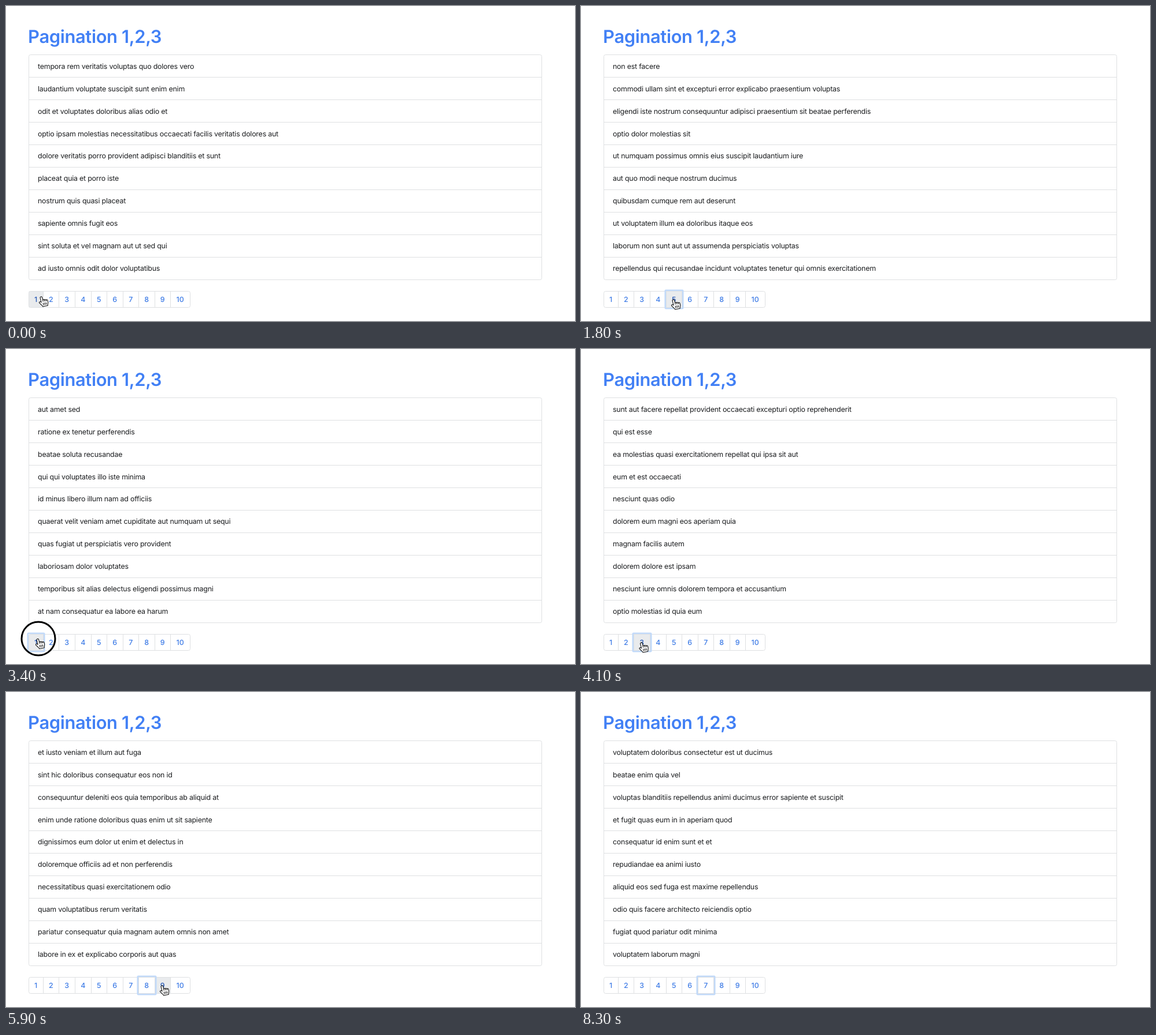
An HTML page that plays this animation: 984 px wide and 546 px high, repeating every 8600 ms.

```html
<!DOCTYPE html>
<html lang="en">
<head>
<meta charset="utf-8">
<title>Pagination</title>
<style>
  html, body { margin: 0; width: 100%; height: 100%; overflow: hidden; background: #fff; }
  svg { display: block; width: 984px; height: 546px; }
  text { font-family: Inter, "Open Sans", sans-serif; text-rendering: geometricPrecision; }
  .title { font-size: 30.9px; font-weight: 600; letter-spacing: -.36px; fill: #4280f5; }
  .row { font-size: 12.4px; letter-spacing: -.21px; fill: #1c1e20; }
  .num { font-size: 12.4px; font-weight: 500; text-anchor: middle; fill: #3d7be6; }
  .num.over { fill: #2457b5; }
  .line { fill: none; stroke: #dee0e2; }
</style>
</head>
<body>
<svg id="stage" viewBox="0 0 984 546"></svg>
<script>
const PAGES = `sunt aut facere repellat provident occaecati excepturi optio reprehenderit
qui est esse
ea molestias quasi exercitationem repellat qui ipsa sit aut
eum et est occaecati
nesciunt quas odio
dolorem eum magni eos aperiam quia
magnam facilis autem
dolorem dolore est ipsam
nesciunt iure omnis dolorem tempora et accusantium
optio molestias id quia eum

et ea vero quia laudantium autem
in quibusdam tempore odit est dolorem
dolorum ut in voluptas mollitia et saepe quo animi
voluptatem eligendi optio
eveniet quod temporibus
sint suscipit perspiciatis velit dolorum rerum ipsa laboriosam odio
fugit voluptas sed molestias voluptatem provident
voluptate et itaque vero tempora molestiae
adipisci placeat illum aut reiciendis qui
doloribus ad provident suscipit at

asperiores ea ipsam voluptatibus modi minima quia sint
dolor sint quo a velit explicabo quia nam
maxime id vitae nihil numquam
autem hic labore sunt dolores incidunt
rem alias distinctio quo quis
est et quae odit qui non
quasi id et eos tenetur aut quo autem
delectus ullam et corporis nulla voluptas sequi
iusto eius quod necessitatibus culpa ea
a quo magni similique perferendis

ullam ut quidem id aut vel consequuntur
doloremque illum aliquid sunt
qui explicabo molestiae dolorem
magnam ut rerum iure
id nihil consequatur molestias animi provident
fuga nam accusamus voluptas reiciendis itaque
provident vel ut sit ratione est
explicabo et eos deleniti nostrum ab id repellendus
eos dolorem iste accusantium est eaque quam
enim quo cumque

non est facere
commodi ullam sint et excepturi error explicabo praesentium voluptas
eligendi iste nostrum consequuntur adipisci praesentium sit beatae perferendis
optio dolor molestias sit
ut numquam possimus omnis eius suscipit laudantium iure
aut quo modi neque nostrum ducimus
quibusdam cumque rem aut deserunt
ut voluptatem illum ea doloribus itaque eos
laborum non sunt aut ut assumenda perspiciatis voluptas
repellendus qui recusandae incidunt voluptates tenetur qui omnis exercitationem

soluta aliquam aperiam consequatur illo quis voluptas
qui enim et consequuntur quia animi quis voluptate quibusdam
ut quo aut ducimus alias
sit asperiores ipsam eveniet odio non quia
sit vel voluptatem et non libero
qui et at rerum necessitatibus
sed ab est est
voluptatum itaque dolores nisi et quasi
qui commodi dolor at maiores et quis id accusantium
consequatur placeat omnis quisquam quia reprehenderit fugit veritatis facere

voluptatem doloribus consectetur est ut ducimus
beatae enim quia vel
voluptas blanditiis repellendus animi ducimus error sapiente et suscipit
et fugit quas eum in in aperiam quod
consequatur id enim sunt et et
repudiandae ea animi iusto
aliquid eos sed fuga est maxime repellendus
odio quis facere architecto reiciendis optio
fugiat quod pariatur odit minima
voluptatem laborum magni

et iusto veniam et illum aut fuga
sint hic doloribus consequatur eos non id
consequuntur deleniti eos quia temporibus ab aliquid at
enim unde ratione doloribus quas enim ut sit sapiente
dignissimos eum dolor ut enim et delectus in
doloremque officiis ad et non perferendis
necessitatibus quasi exercitationem odio
quam voluptatibus rerum veritatis
pariatur consequatur quia magnam autem omnis non amet
labore in ex et explicabo corporis aut quas

tempora rem veritatis voluptas quo dolores vero
laudantium voluptate suscipit sunt enim enim
odit et voluptates doloribus alias odio et
optio ipsam molestias necessitatibus occaecati facilis veritatis dolores aut
dolore veritatis porro provident adipisci blanditiis et sunt
placeat quia et porro iste
nostrum quis quasi placeat
sapiente omnis fugit eos
sint soluta et vel magnam aut ut sed qui
ad iusto omnis odit dolor voluptatibus

aut amet sed
ratione ex tenetur perferendis
beatae soluta recusandae
qui qui voluptates illo iste minima
id minus libero illum nam ad officiis
quaerat velit veniam amet cupiditate aut numquam ut sequi
quas fugiat ut perspiciatis vero provident
laboriosam dolor voluptates
temporibus sit alias delectus eligendi possimus magni
at nam consequatur ea labore ea harum`.split("\n\n").map(p => p.split("\n"));

const LOOP = 8600, STEP = 100, LOAD = 200, START_PAGE = 9, GONE = 8300;
const HOLD = 200, LEAD = 100;
const LEFT = 39.5, RIGHT = 318.5, TOP = 494.5, BOTTOM = 522.5;

// left edge of button i; edge 10 closes the bar
function edge(i) {
  if (i === 0) return LEFT;
  return i === 10 ? RIGHT : Math.floor(36.8 + 27.56 * i) + .5;
}
const width = i => edge(i + 1) - edge(i);
const center = i => edge(i) + width(i) / 2;

const click = (time, page, dx = 0, y = 509) => ({ time, page, x: center(page - 1) + dx, y });
const CLICKS = [
  click(300, 1, 1, 504), click(700, 2, 0, 505), click(1200, 4, -11, 506), click(1600, 5),
  click(2100, 8), click(2500, 10, -5), click(3400, 1, 4, 502.5), click(4000, 3),
  click(4600, 6, -1, 503), click(5000, 7), click(5600, 8), click(6000, 9),
  click(6900, 1, 9, 511), click(7800, 7)
];
const STOPS = [{ time: -HOLD, x: 62, y: 504 }, ...CLICKS, { time: GONE, x: 349, y: 533 }];

const stage = document.getElementById("stage");

function set(el, attrs) {
  for (const key in attrs) el.setAttribute(key, attrs[key]);
  return el;
}

function add(tag, attrs, parent = stage) {
  return parent.appendChild(set(document.createElementNS("http://www.w3.org/2000/svg", tag), attrs));
}

function show(el, on) {
  el.style.display = on ? "" : "none";
}

add("text", { class: "title", x: 38.1, y: 64 }).textContent = "Pagination 1,2,3";

add("rect", { class: "line", x: LEFT, y: 84.5, width: 887, height: 390, rx: 3 });
const rows = PAGES[0].map((_, i) => {
  if (i) add("path", { class: "line", d: `M40 ${84.5 + 39 * i}H926` });
  return add("text", { class: "row", x: 55, y: 108.8 + 38.9 * i });
});

const hover = add("rect", { y: TOP, height: BOTTOM - TOP, fill: "#e9ebed" });
add("rect", { class: "line", x: LEFT, y: TOP, width: RIGHT - LEFT, height: BOTTOM - TOP, rx: 3 });
const ring = add("rect", {
  y: TOP - 1.75, height: BOTTOM - TOP + 3.5, rx: 1, fill: "none", stroke: "#c2daf9", "stroke-width": 2.6
});
const nums = PAGES.map((_, i) => {
  if (i) stage.insertBefore(add("path", { class: "line", d: `M${edge(i)} ${TOP}V${BOTTOM}` }), ring);
  const el = add("text", { class: "num", x: center(i) - .3, y: 513.2 });
  el.textContent = i + 1;
  return el;
});

const halo = add("circle", { r: 29, fill: "none", stroke: "#000", "stroke-width": 3 });
const hand = add("g", { stroke: "#111", "stroke-width": 1.1, "stroke-linejoin": "round", "stroke-linecap": "round" });
add("path", {
  fill: "#fff",
  d: "M-1.7 1.5C-1.7-.6 1.7-.6 1.7 1.5L1.9 6.2C2.3 5.2 4.5 5.2 4.7 6.6C5.3 5.9 7.1 6 7.4 7.3" +
     "C8.2 6.7 10 7 10 8.8V11C10 13.5 8.6 14.2 8.4 17.3H-.4C-.6 15.5-2 14.5-3.2 12.6" +
     "L-5 9.8C-5.4 8.4-3.6 7.4-2.3 8.6L-1.5 9.6Z"
}, hand);
add("path", { fill: "none", d: "M1.9 6.2V8.6M4.7 6.6V8.8M7.4 7.3V9M1.4 11.6V14.8M3.9 11.6V14.8M6.4 11.6V14.8" }, hand);

// rest after each stop, then ease to the next one just before its click
function pointerAt(t) {
  const next = STOPS.findIndex(s => s.time > t);
  const b = STOPS[next < 0 ? STOPS.length - 1 : next];
  const a = next < 0 ? b : STOPS[next - 1];
  const from = a.time + HOLD, to = b.time - LEAD;
  const u = Math.min(1, Math.max(0, (t - from) / Math.max(1, to - from)));
  const e = u * u * (3 - 2 * u);
  return [a.x + (b.x - a.x) * e, a.y + (b.y - a.y) * e];
}

const lastClick = t => CLICKS.filter(c => c.time <= t).pop();

function draw(ms) {
  const t = Math.floor(ms / STEP) * STEP;
  const [x, y] = pointerAt(t);
  const visible = t < GONE;
  const focus = lastClick(t), loaded = lastClick(t - LOAD);

  const page = PAGES[(loaded ? loaded.page : START_PAGE) - 1];
  rows.forEach((row, i) => { row.textContent = page[i]; });

  const inBar = visible && y > TOP && y < BOTTOM;
  const over = inBar ? nums.findIndex((_, i) => x >= edge(i) && x < edge(i + 1)) : -1;
  show(hover, over >= 0);
  if (over >= 0) set(hover, { x: edge(over), width: width(over) });
  nums.forEach((num, i) => num.classList.toggle("over", i === over));

  show(ring, focus);
  if (focus) {
    const i = focus.page - 1;
    set(ring, { x: edge(i) - 1.75, width: width(i) + 3.5 });
  }

  show(halo, focus && focus.time === t);
  set(halo, { cx: x, cy: y - .5 });
  show(hand, visible);
  set(hand, { transform: `translate(${x - 1.5} ${y}) rotate(-12)` });
}

function tick() {
  draw(performance.now() % LOOP);
  requestAnimationFrame(tick);
}
tick();
</script>
</body>
</html>
```
